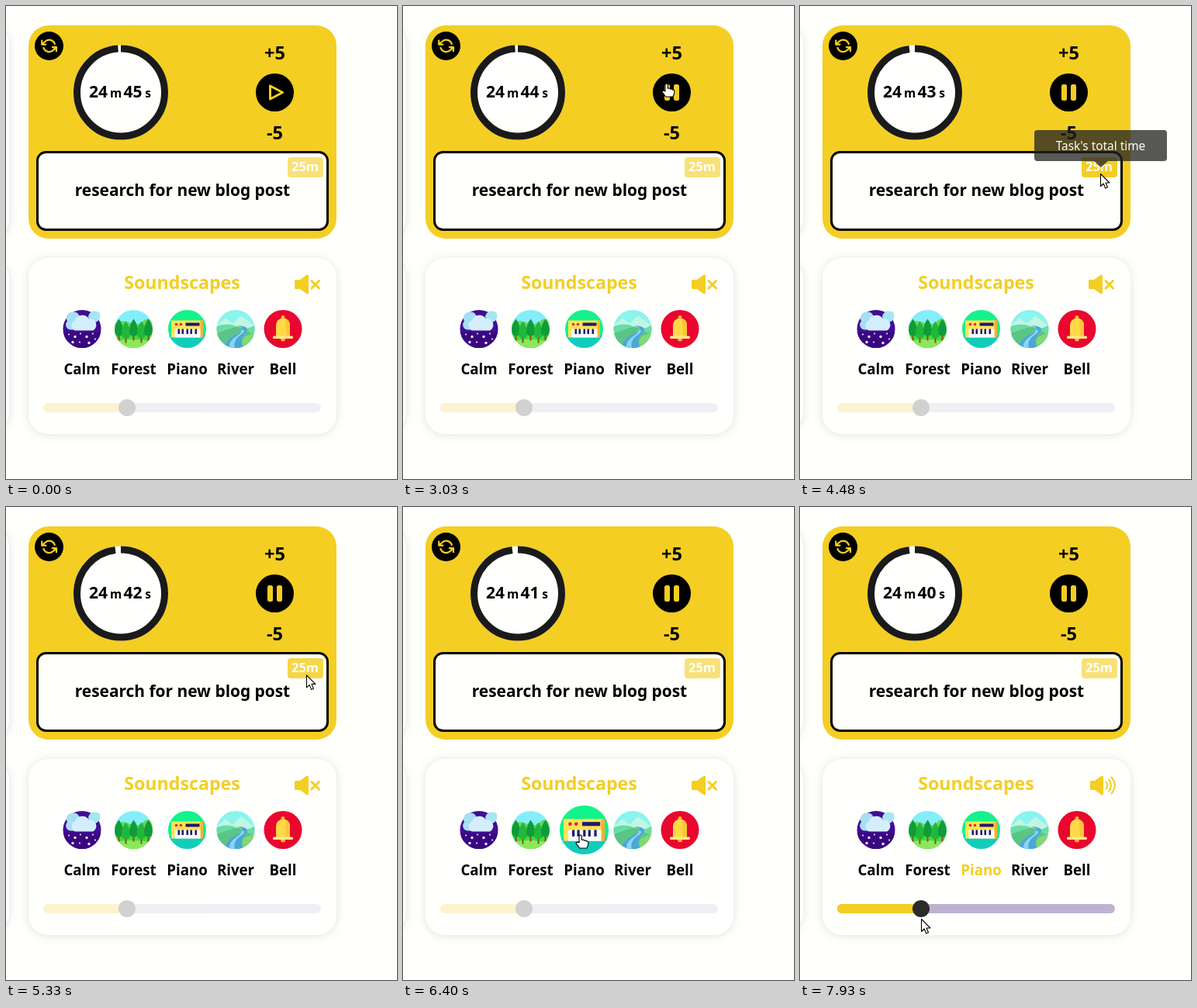
An HTML page that plays this animation: 504x610 px, repeating every 8 s.

```html
<!DOCTYPE html>
<html lang="en">
<head>
<meta charset="utf-8">
<title>Focus timer</title>
<style>
  html, body { margin: 0; width: 100%; height: 100%; overflow: hidden; background: #fffffb; }
  svg { display: block; }
  text { font: bold 18.7px "Noto Sans", "Open Sans", sans-serif; text-anchor: middle; }
  .card { fill: #fffffe; filter: drop-shadow(0 1px 6px rgba(40, 40, 110, .14)); }
  .y { fill: #f4ce23; }
  .line { fill: none; stroke: #f4ce23; stroke-linecap: round; stroke-linejoin: round; }
  .big { font-size: 21px; }
  .unit { font-size: 15.5px; }
  .step { font-size: 23.6px; }
</style>
</head>
<body>
<svg width="504" height="610" viewBox="0 0 504 610">
  <defs><clipPath id="disc"><circle r="24.5"/></clipPath></defs>

  <rect class="card" x="-100" y="25" width="104" height="275" rx="25"/>
  <rect class="card" x="-100" y="330" width="104" height="215" rx="20"/>

  <!-- timer -->
  <rect class="y" x="29" y="25" width="397" height="275" rx="26"/>
  <circle cx="55.5" cy="51.5" r="18.5"/>
  <path class="line" stroke-width="2.6" transform="translate(45.4 41.2) scale(.85)"
    d="M1 4v6h6M23 20v-6h-6M20.5 9A9 9 0 0 0 5.6 5.6L1 10M23 14l-4.6 4.4A9 9 0 0 1 3.5 15"/>
  <circle cx="148" cy="111.5" r="61" fill="#fffffd"/>
  <circle id="ring" cx="148" cy="111.5" r="56.5" fill="none" stroke="#1a1a1a" stroke-width="9"
    pathLength="100" transform="rotate(-90 148 111.5)"/>
  <text class="big" x="119" y="118">24</text>
  <text class="unit" x="141.5" y="118">m</text>
  <text class="big" x="163.5" y="118" id="sec">45</text>
  <text class="unit" x="183" y="118">s</text>

  <text class="step" x="346.5" y="69">+5</text>
  <text class="step" x="346.5" y="172">-5</text>
  <circle cx="346.5" cy="111.5" r="24.5"/>
  <path id="play" class="line y" stroke-width="3" d="M340.5 103V120L356.5 111.5Z"/>
  <g id="pause" class="y">
    <rect x="337" y="101" width="7" height="21" rx="2.5"/>
    <rect x="349" y="101" width="7" height="21" rx="2.5"/>
  </g>

  <rect x="40.5" y="188.5" width="374" height="100" rx="11" fill="#fffffb" stroke="#000" stroke-width="3"/>
  <text x="227.5" y="245" style="font-size:20.9px">research for new blog post</text>
  <rect id="badge" class="y" x="363" y="195" width="46" height="26" rx="4"/>
  <text x="385.5" y="213" fill="#fff" style="font-size:16.5px">25m</text>

  <!-- sounds -->
  <rect class="card" x="29" y="325" width="397" height="227" rx="25"/>
  <text class="y" x="227" y="365" style="font-size:23.2px">Soundscapes</text>
  <g id="mute">
    <path class="y" d="M373.5 353H379L388 346.5Q390 346 390 348V370Q390 372 388 371.5L379 365H373.5Q372 365 372 363.5V354.5Q372 353 373.5 353Z"/>
    <path class="line" stroke-width="3" d="M394 354.500L403.500 364M403.500 354.500L394 364"/>
  </g>
  <g id="loud">
    <path class="y" d="M375.500 353H380L389 346.500Q391 346 391 348V370Q391 372 389 371.500L380 365H375.500Q374 365 374 363.500V354.500Q374 353 375.500 353Z"/>
    <path class="line" stroke-width="2" d="M394.500 354.500Q398 359 394.500 363.500M398 351.500Q404 359 398 366.500M401.500 348.500Q410 359 401.500 369.500"/>
  </g>

  <g transform="translate(98 416.500)">
    <g clip-path="url(#disc)">
      <rect x="-25" y="-25" width="50" height="50" fill="#420d96"/>
      <path d="M-25 4H25V25H-25Z" fill="#390880"/>
    </g>
    <path d="M10-11a7.500 7.500 0 0 1 9-11.500q4.500 0 4.500 5.500q0 7-8 9Z" fill="#a6e6f3"/>
    <path d="M-14 1a6.500 6.500 0 0 1-5-11a8 8 0 0 1 8-12q5 0 7 4L2-10 12 1Z" fill="#a6dff4"/>
    <path d="M-9 2a7 7 0 0 1 0-13a10 10 0 0 1 18-2a8 8 0 0 1 5 15Z" fill="#d5eefd"/>
    <g id="snow" fill="#f3e8ff"></g>
  </g>

  <g transform="translate(164.500 416.500)" clip-path="url(#disc)">
    <rect x="-25" y="-25" width="50" height="50" fill="#83eefa"/>
    <path d="M-25-7Q-15-13-5-8T12-10 25-7V15H-25Z" fill="#64d85b"/>
    <path d="M-25 9Q0 4 25 9V25H-25Z" fill="#49d83c"/>
    <path d="M-25 16Q0 10 25 17V25H-25Z" fill="#8ce85a"/>
    <g id="trees"></g>
  </g>

  <g id="piano" clip-path="url(#disc)">
    <rect x="-25" y="-25" width="50" height="36" fill="#12f38a"/>
    <rect x="-25" y="8" width="50" height="17" fill="#11cdbb"/>
    <rect x="-20.500" y="-11" width="41" height="22" fill="#ffe454"/>
    <rect x="17" y="-11" width="3.500" height="22" fill="#fcae36"/>
    <circle cx="-14" cy="-6" r="1.800" fill="#e8203c"/>
    <circle cx="-8" cy="-6" r="1.800" fill="#e8203c"/>
    <rect x="-2" y="-8" width="18" height="4" fill="#22186b"/>
    <rect x="-16" y="0" width="33" height="11" fill="#f6fbff"/>
    <g id="keys" fill="#22186b"></g>
  </g>

  <g id="river" clip-path="url(#disc)">
    <rect x="-25" y="-25" width="50" height="50" fill="#8af4ee"/>
    <path d="M-25-4L-13-14-4-7 7-17 25-4V8H-25Z" fill="#c2f5e3"/>
    <path d="M-25-3Q-11-9 2-3T25-6V25H-25Z" fill="#68dda4"/>
    <path d="M-25 6Q-8-1 4-3L25 8V25H-25Z" fill="#5bc486"/>
    <path d="M2-4Q16 0 4 5T-17 25H10Q4 14 12 6T7-4Z" fill="#4ba6da"/>
    <path d="M7 1Q9 4 0 10T-8 25H-1Q-4 15 6 8T7 1Z" fill="#8bd5f3"/>
    <path d="M13 9Q5 15 11 25H25V5Z" fill="#83d873"/>
  </g>

  <g transform="translate(357 416.500)">
    <circle r="24.500" fill="#e9072f"/>
    <circle cy="-15" r="2.500" fill="#f7b52c"/>
    <circle cy="13" r="3" fill="#f7b52c"/>
    <path d="M-9 10V-5a9 9 0 0 1 18 0V10Z" fill="#ffda48"/>
    <path d="M3-13.500A9 9 0 0 1 9-5V10H4Z" fill="#fbc638"/>
    <rect x="-13" y="9" width="26" height="3.500" rx="1.500" fill="#ffe78a"/>
  </g>

  <text x="98" y="475">Calm</text>
  <text x="164.500" y="475">Forest</text>
  <text x="233.500" y="475" id="label">Piano</text>
  <text x="296" y="475">River</text>
  <text x="357" y="475">Bell</text>

  <g id="slider">
    <rect x="48" y="512" width="358" height="12" rx="6" fill="#beb2d2"/>
    <path class="y" d="M156 512H54a6 6 0 0 0 0 12H156Z"/>
    <circle cx="156" cy="518" r="11" fill="#2b2b2b"/>
  </g>

  <g id="tip">
    <path d="M306 160H469a4 4 0 0 1 4 4V196a4 4 0 0 1-4 4H397L388 208 379 200H306a4 4 0 0 1-4-4V164a4 4 0 0 1 4-4Z" fill="#222" fill-opacity=".8"/>
    <text x="387.500" y="186" fill="#fff" style="font-size:15.400px;font-weight:400">Task's total time</text>
  </g>

  <g id="cursor" fill="#fff" stroke="#000" stroke-width="1.100" stroke-linejoin="round">
    <path id="arrow" d="M.5.5V16.500L4.200 13 6.700 19 9.500 17.800 7 12H12Z"/>
    <path id="hand" d="M-2 10V1.800a1.700 1.700 0 0 1 3.400 0V6.300L4 6.100 4.600 7.200 7 7 7.600 8.200Q9.800 7.600 9.800 9.600V12.500L8 17H-1.200L-5.700 11.300Q-6.400 9-4 9Z"/>
  </g>
</svg>

<script>
const $ = id => document.getElementById(id);
const set = (id, name, value) => $(id).setAttribute(name, value);
const show = (id, on) => set(id, 'visibility', on ? 'visible' : 'hidden');
const ramp = (t, from, length) => {
  const u = Math.min(1, Math.max(0, (t - from) / length));
  return u * u * (3 - 2 * u);
};

// small icon details: x, y
$('snow').innerHTML = [[-17, 7], [-9, 10], [-2, 6], [6, 10], [14, 6], [-12, 17], [-3, 17], [9, 18], [17, 13]]
  .map(([x, y], i) => `<circle cx="${x}" cy="${y}" r="${i % 2 ? 1.7 : 1.1}"/>`).join('');
$('trees').innerHTML = [-19, -10, 0, 10, 19].map((x, i) =>
  `<g transform="translate(${x} ${i % 2 ? 2 : -1})"><rect x="-1" y="5" width="2" height="11" fill="#875027"/>
   <path d="M0-12Q6-4 5.500 5Q5 10 0 10T-5.500 5Q-6-4 0-12Z" fill="${i % 2 ? '#20b83b' : '#109c38'}"/></g>`).join('');
$('keys').innerHTML = [-12, -7, -1, 4, 10]
  .map(x => `<rect x="${x}" y="0" width="2.500" height="6.500"/>`).join('');

// cursor path: time, x, y
const path = [
  [700, 134, 13], [900, 190, 34], [1200, 300, 83], [1500, 340, 100],
  [3880, 340, 100], [4050, 347, 148], [4180, 372, 194], [4300, 387, 216],
  [5330, 387, 216], [5500, 372, 285], [5750, 315, 402], [5950, 290, 422], [6100, 252, 424], [6250, 229, 423],
  [7400, 229, 423], [7550, 213, 455], [7750, 173, 512], [7930, 156, 531]
];
const ticks = [3030, 4050, 5050, 6080, 7080];

function cursorAt(t) {
  const i = path.findIndex(p => p[0] > t);
  if (i < 0) return path[path.length - 1].slice(1);
  if (i === 0) return path[0].slice(1);
  const [a, x, y] = path[i - 1], [b, x2, y2] = path[i], u = (t - a) / (b - a);
  return [x + (x2 - x) * u, y + (y2 - y) * u];
}

function draw(t) {
  const playing = t >= 2000, sound = t >= 6950;
  $('sec').textContent = 45 - ticks.filter(k => t >= k).length;
  set('ring', 'stroke-dasharray', `${99 - ramp(t, 3030, 500)} 100`);
  show('play', !playing);
  show('pause', playing);

  set('badge', 'opacity', .6 + .4 * (ramp(t, 4250, 200) - ramp(t, 5270, 130)));
  set('tip', 'opacity', t < 5330 ? ramp(t, 4250, 270) : 0);

  show('mute', !sound);
  show('loud', sound);
  set('label', 'fill', sound ? '#f4ce23' : '#000');
  set('slider', 'opacity', sound ? 1 : .21);
  const piano = 1 + .29 * (ramp(t, 6130, 270) - ramp(t, 7470, 270));
  const river = 1 + .29 * (ramp(t, 5750, 270) - ramp(t, 6110, 270));
  set('piano', 'transform', `translate(233.500 416.500) scale(${piano})`);
  set('river', 'transform', `translate(296 416.500) scale(${river})`);

  const hand = t >= 1330 && t < 4130 || t >= 5750 && t < 7500;
  const moving = t >= 700;
  set('cursor', 'transform', `translate(${cursorAt(t)})`);
  show('arrow', moving && !hand);
  show('hand', moving && hand);
}

const start = performance.now();
function loop(now) {
  draw(Math.max(0, now - start) % 8000);
  requestAnimationFrame(loop);
}
draw(0);
requestAnimationFrame(loop);
</script>
</body>
</html>
```
